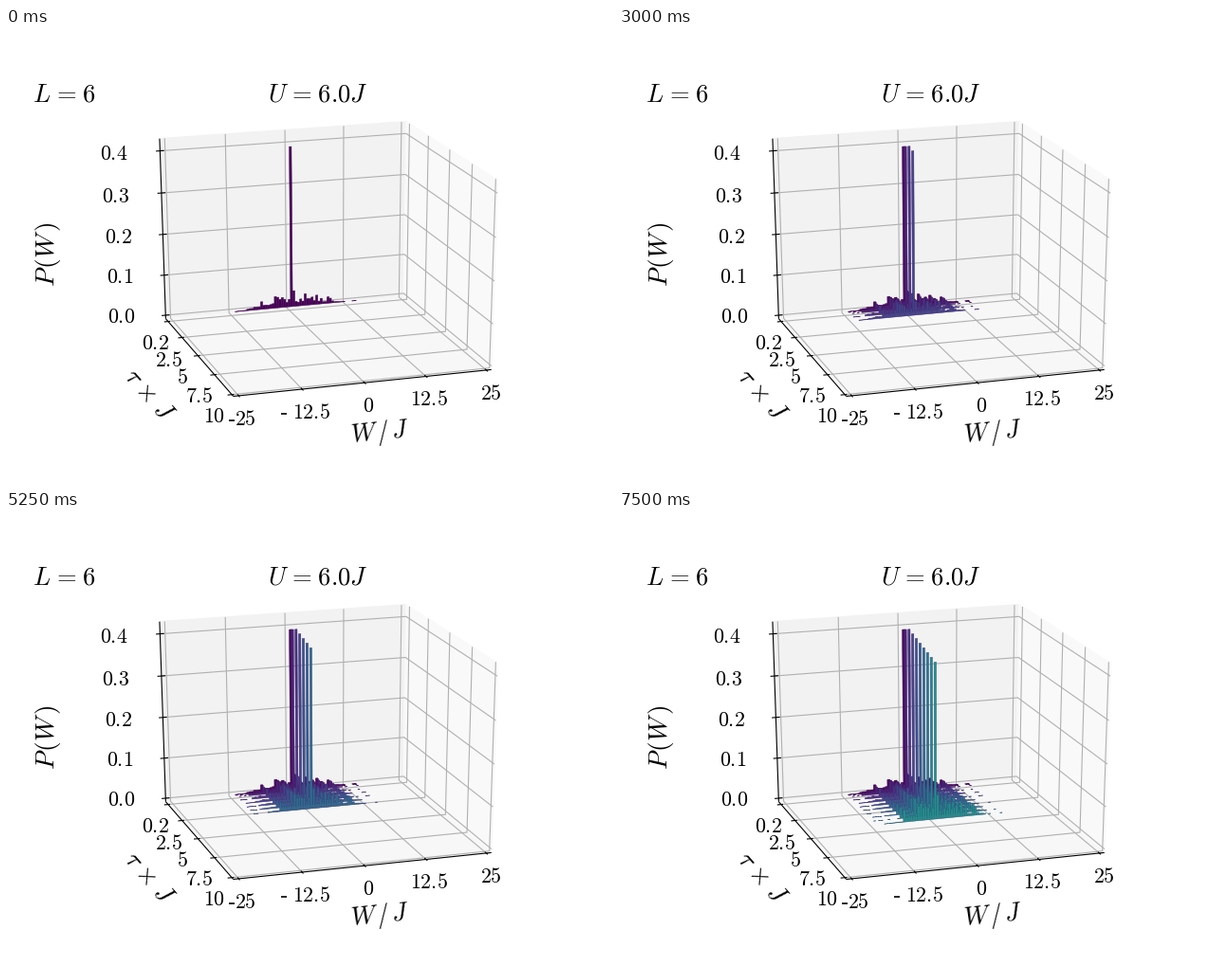
These frames come from a looping animation (640x480 px, 8 s). A matplotlib script:

```python
import numpy as np
import matplotlib.pyplot as plt
from matplotlib.animation import FuncAnimation
from matplotlib.collections import LineCollection, PolyCollection

plt.rcParams["mathtext.fontset"] = "cm"

W_PX, H_PX, DPI = 640, 480, 100
STEP, HOLD, FRAMES = 250, 3, 32

# axis limits: data range plus 1/48 on each side
T0, T1 = -0.208, 10.208
W0, W1 = -26.04, 26.04
Z0, Z1 = -0.00875, 0.42875

# (tau, work, prob) -> pixel anchors that fix the camera
ANCHORS = [
    (T0, W0, Z0, 168, 306.7), (T0, W0, Z1, 162, 117),
    (T0, W1, Z1, 421.5, 98), (T0, W1, Z0, 418, 283),
    (T1, W1, Z1, 518, 160), (T1, W1, Z0, 511.5, 360.5),
    (T1, W0, Z0, 239, 388), (T0, 0, Z0, 297, 294.8),
    (T0, 0, Z1, 294, 107.5), (T1, 0, Z0, 378.5, 374),
    (5, W0, Z0, 202.5, 346), (5, W1, Z1, 469, 129.3),
    (5, W1, Z0, 464, 321),
]


def unit(p):
    t, w, z = np.moveaxis(np.asarray(p, float), -1, 0)
    return np.stack([(t - 5) / 10, w / 52, (z - 0.21) / 0.44,
                     np.ones_like(t)], axis=-1)


def fit_camera(anchors):
    rows, rhs = [], []
    for *p, x, y in anchors:
        q = unit(p)
        rows.append(np.r_[q, np.zeros(4), -x * q[:3]])
        rows.append(np.r_[np.zeros(4), q, -y * q[:3]])
        rhs += [x, y]
    sol = np.linalg.lstsq(np.array(rows), np.array(rhs), rcond=None)[0]
    return np.append(sol, 1).reshape(3, 4)


CAMERA = fit_camera(ANCHORS)


def project(p):
    h = unit(p) @ CAMERA.T
    return h[..., :2] / h[..., 2:]


fig = plt.figure(figsize=(W_PX / DPI, H_PX / DPI), dpi=DPI, facecolor="white")
ax = fig.add_axes([0, 0, 1, 1])
ax.set_xlim(0, W_PX)
ax.set_ylim(H_PX, 0)
ax.axis("off")

# panes
PANES = [
    ([(T0, W0, Z0), (T0, W1, Z0), (T0, W1, Z1), (T0, W0, Z1)], 0.95),
    ([(T0, W1, Z0), (T1, W1, Z0), (T1, W1, Z1), (T0, W1, Z1)], 0.975),
    ([(T0, W0, Z0), (T0, W1, Z0), (T1, W1, Z0), (T1, W0, Z0)], 0.97),
]
for corners, grey in PANES:
    ax.add_patch(plt.Polygon(project(corners), fc=str(grey), ec=str(grey), lw=1))

# grid, ticks and axis lines
T_TICKS = [0.2, 2.5, 5, 7.5, 10]
W_TICKS = [-25, -12.5, 0, 12.5, 25]
Z_TICKS = [0, 0.1, 0.2, 0.3, 0.4]
grid = [[(t, W0, Z0), (t, W1, Z0), (t, W1, Z1)] for t in T_TICKS]
grid += [[(T1, w, Z0), (T0, w, Z0), (T0, w, Z1)] for w in W_TICKS]
grid += [[(T0, W0, z), (T0, W1, z), (T1, W1, z)] for z in Z_TICKS]
ax.add_collection(LineCollection([project(g) for g in grid],
                                 colors="#b0b0b0", linewidths=0.8))

DW, DT = 50 / 12, 10 / 12
ticks = [[(t, W0 - 0.2 * DW, Z0), (t, W0 + 0.1 * DW, Z0)] for t in T_TICKS]
ticks += [[(T1 + 0.2 * DT, w, Z0), (T1 - 0.2 * DT, w, Z0)] for w in W_TICKS]
ticks += [[(T0, W0 - 0.2 * DW, z), (T0, W0 + 0.2 * DW, z)] for z in Z_TICKS]
axes = [[(T0, W0, Z0), (T0, W0, Z1)], [(T0, W0, Z0), (T1, W0, Z0)],
        [(T1, W0, Z0), (T1, W1, Z0)]]
ax.add_collection(LineCollection([project(s) for s in ticks + axes],
                                 colors="black", linewidths=0.8, zorder=4))


# labels
def label(x, y, s, size=15.8, ha="center", va="baseline", rot=0):
    ax.text(x, y, f"${s}$", fontsize=size, ha=ha, va=va, rotation=rot,
            rotation_mode="anchor" if rot == 0 else "default")


for i, s in enumerate(["0.4", "0.3", "0.2", "0.1", "0.0"]):
    label(114 + 2 * i, [139, 184, 227, 269, 311][i], s)
for x, y, s in [(157, 339, "0.2"), (171, 357, "2.5"), (186, 375, "5"),
                (203, 395, "7.5"), (220, 416, "10")]:
    label(x, y, s)
for x, y, s in [(252, 419, "25"), (321.5, 412, "12.5"), (382.5, 405, "0"),
                (445.5, 398, "12.5"), (511, 392, "25")]:
    label(x, y, s)
for x, y in [(234.8, 413.7), (290, 406.7)]:
    ax.plot([x, x + 6], [y, y], color="black", lw=1.2, solid_capstyle="butt")

GAP = r"\hspace{0.1}"
label(28.5, 77, f"L{GAP}={GAP}6", 19.2, ha="left")
label(328.5, 78, f"U{GAP}={GAP}6.0J", 19.2)
label(44, 238.5, f"P{GAP}(W{GAP})", 19.6, va="center", rot=90)
label(151, 387, rf"\tau{GAP}\times{GAP}J", 19.2, va="center", rot=-48.7)
label(394, 427, f"W{GAP}/{GAP}J", 19.2, va="center", rot=5.7)

# work distribution: side bars in units of 1/428, bins of 0.5 around W = 0.5
LEFT = [.3, .4, .3, .4, .6, 1.5, 2, 2, 3, 3, 3, 8, 4, 4, 3.5, 4, 5, 12, 11, 9,
        11, 8, 5, 8]
RIGHT = [16, 5, 4, 7, 5, 12, 7, 7, 8, 4, 10, 3, 6, 2, 2, 7, 5, 2, 1, 1, .7,
         .4, .3]
BINS = np.r_[-len(LEFT):0, 1:len(RIGHT) + 1, 27, 28]
BASE = np.r_[LEFT, RIGHT, 0.1, 0.2] / 428
TAUS = np.r_[0.2, 0.3, 0.5, np.arange(1, 5, 0.5)]


def peak(t):
    return 0.394 + 0.0135 * (t - 0.2) if t < 1 else 0.405 - 0.0086 * (t - 1)


def bars(k):
    t = TAUS[k]
    rng = np.random.default_rng(k + 3)
    h = BASE * (1 + 0.1 * t + min(t, 1) * rng.uniform(-0.25, 0.25, BASE.size))
    h[BINS < -13] *= max(0.1, 1 - 0.25 * t)
    keep = (h > 0.0015) | (rng.random(h.size) < 0.7)
    n, h = np.r_[BINS[keep], 0], np.r_[h[keep], peak(t)]
    mid, half = 0.5 + 0.5 * n, 0.23
    corners = [(mid - half, 0 * h), (mid - half, h),
               (mid + half, h), (mid + half, 0 * h)]
    quads = np.stack([np.stack([np.full_like(h, t), w, z], -1)
                      for w, z in corners], 1)
    return project(quads)


cmap = plt.get_cmap("viridis")
slices = []
for k in range(len(TAUS)):
    col = np.array(cmap(k / 20)[:3])
    edge = 0.65 * col + 0.35 * np.array(cmap(0.0)[:3])
    slices.append(ax.add_collection(PolyCollection(
        bars(k), facecolors=[col], edgecolors=[edge], linewidths=0.35,
        zorder=5 + 0.1 * k)))


def update(i):
    last = min(i // HOLD, len(slices) - 1)
    for k, s in enumerate(slices):
        s.set_visible(k <= last)
    return slices


anim = FuncAnimation(fig, update, frames=FRAMES, interval=STEP, repeat=True,
                     repeat_delay=0, blit=False)
plt.show()
```
